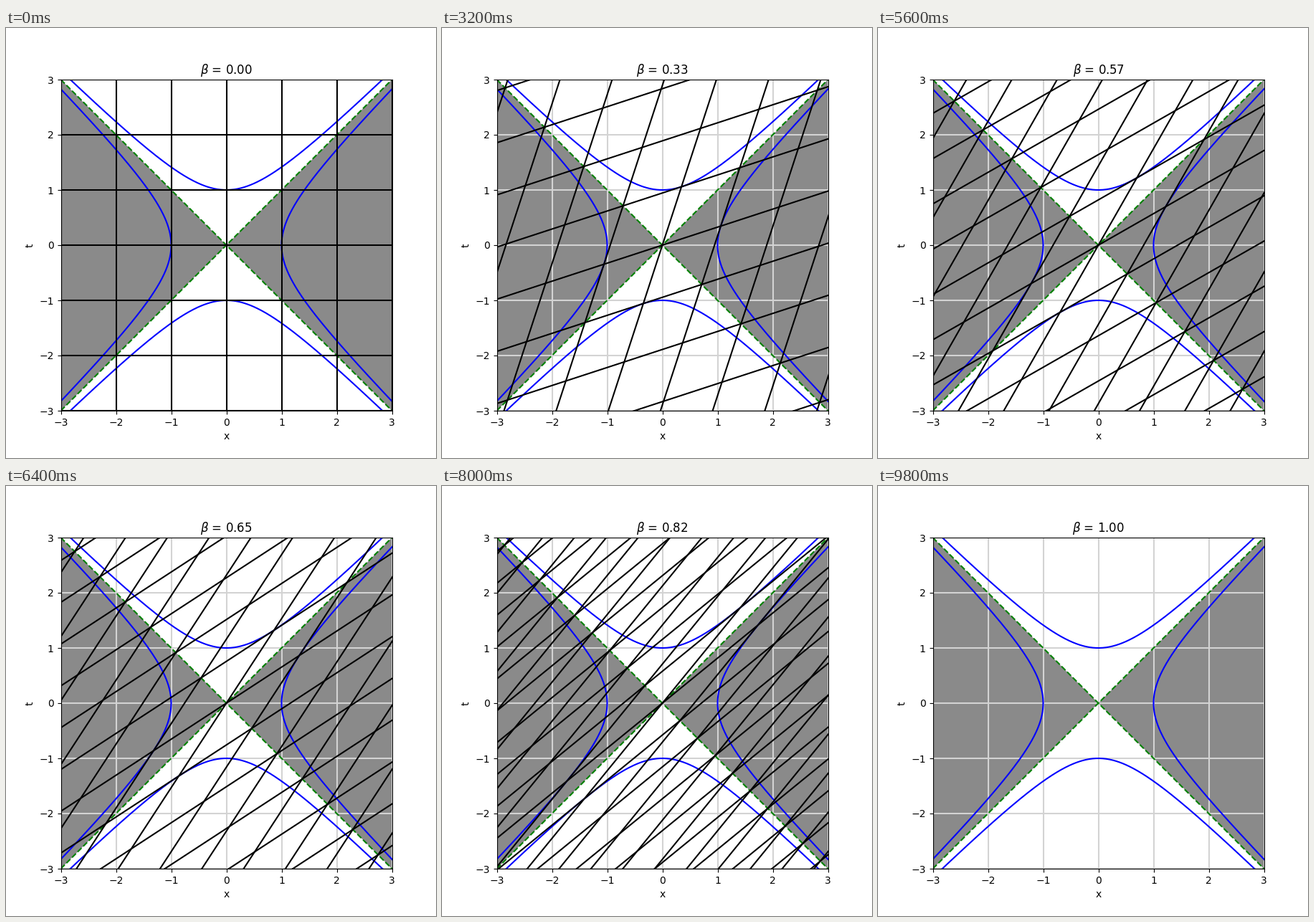
A matplotlib script that plays this animation: 600 by 600 pixels, repeating every 10 s.

```python
import numpy as np
import matplotlib.pyplot as plt
from matplotlib.animation import FuncAnimation

FRAMES = 50
LIM = 3
betas = np.linspace(0, 1, FRAMES)
levels = np.arange(-20, 21)

fig, ax = plt.subplots(figsize=(6, 6), dpi=100)
ax.set_aspect("equal")
ax.set_xlim(-LIM, LIM)
ax.set_ylim(-LIM, LIM)
ax.set_xticks(range(-LIM, LIM + 1))
ax.set_yticks(range(-LIM, LIM + 1))
ax.set_xlabel("x")
ax.set_ylabel("t")
ax.grid(color="lightgray", linewidth=1.5)

# Spacelike region and light cone
s = np.linspace(-LIM, LIM, 301)
ax.fill_between(s, -np.abs(s), np.abs(s), facecolor="#8a8a8a", linewidth=0)
ax.plot(s, s, "--", color="green")
ax.plot(s, -s, "--", color="green")

# Unit hyperbolas
h = np.sqrt(1 + s**2)
for sign in (1, -1):
    ax.plot(s, sign * h, color="blue")
    ax.plot(sign * h, s, color="blue")

time_lines = [ax.plot([], [], color="black")[0] for _ in levels]
space_lines = [ax.plot([], [], color="black")[0] for _ in levels]
title = ax.set_title("")
ends = np.array([-LIM - 1.0, LIM + 1.0])


def update(i):
    beta = betas[i]
    step = np.sqrt(1 - beta**2)
    for n, tl, sl in zip(levels, time_lines, space_lines):
        across = beta * ends + n * step
        tl.set_data(across, ends)
        sl.set_data(ends, across)
        # The boosted grid is undefined at the speed of light
        tl.set_visible(beta < 1)
        sl.set_visible(beta < 1)
    title.set_text(rf"$\beta$ = {beta:.2f}")
    return time_lines + space_lines + [title]


anim = FuncAnimation(fig, update, frames=FRAMES, interval=200,
                     repeat=True, repeat_delay=0, blit=False)
plt.show()
```
